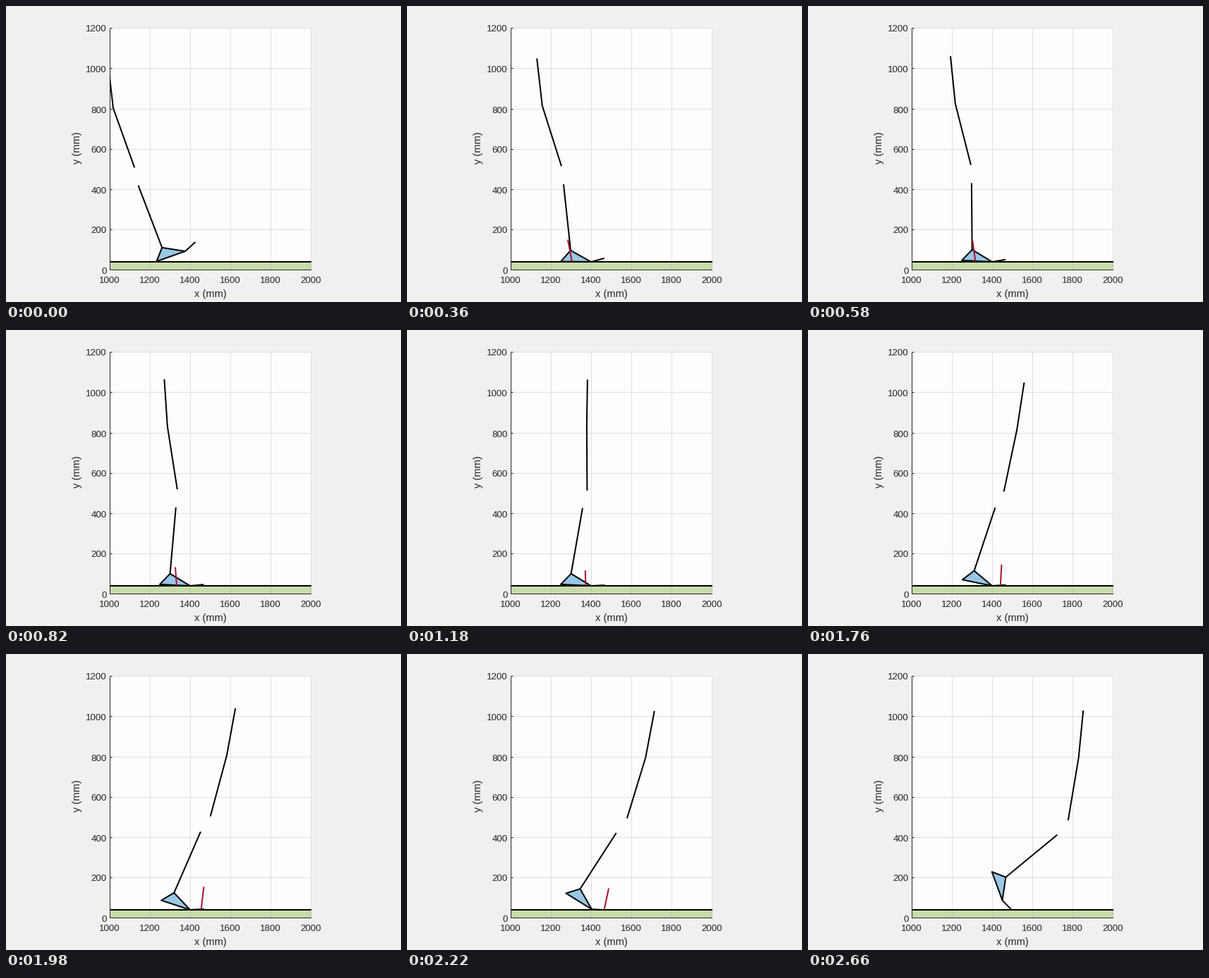
A matplotlib script that plays this animation: 560 px wide and 420 px high, repeating every 2.76 s.

```python
import numpy as np
import matplotlib
import matplotlib.pyplot as plt
from matplotlib.animation import FuncAnimation
from matplotlib.patches import Polygon, Rectangle

W, H, DPI = 560, 420, 100
PX = 72 / DPI  # one pixel in points
TICK = 20      # ms per drawn frame
LEFT, RIGHT, TOP, BOTTOM = 147, 432, 31, 374
GROUND = 363
STEP = 57.1    # pixels per 200 mm
INK = "#262626"
matplotlib.rcParams["font.family"] = "Liberation Sans"

# The 42 poses are held unevenly: 100 and 20 ms in turn.
run = [100, 20] * 4 + [100]
holds = np.array([100, 20] + run * 4 + [20, 100, 100])
holds = np.array([100, 20] + run + run * 3 + [100, 20, 100, 100])
pose_at = np.repeat(np.arange(len(holds)), holds // TICK)
pose = np.arange(len(holds))
LAST = pose[-1]
KEYS = np.array([0, 6, 13, 24, 35, 41]) / LAST


def smooth(*vals):
    """Polynomial through the key values, sampled at every pose."""
    return np.polyval(np.polyfit(KEYS, vals, len(KEYS) - 1), pose / LAST)


def up(start, length, degrees):
    """End of a segment leaning by degrees from the vertical."""
    a = np.radians(degrees)
    return start + length * np.stack([np.sin(a), -np.cos(a)], axis=1)


# The ball of the foot lands, rests on the ground, then pushes off.
land = np.clip(1 - pose / 6, 0, 1) ** 2
push = np.clip((pose - 33) / 8, 0, 1) ** 2
ball = np.stack([261 - 7 * land + 14.5 * push, GROUND - 15 * land - 13.5 * push], axis=1)

# The foot is a rigid triangle; the leg is a chain of segments above it.
foot_angle = smooth(-19.5, 0.6, 2.7, 6, 31.8, 70)
heel = up(ball, 43, foot_angle - 90)
ankle = up(ball, 33.2, foot_angle + 28.5 - 90)
toe = up(ball, 19.5, smooth(-42, -15, -5.4, -2.8, 3, 46) + 90)
shank = up(ankle, 94.5, smooth(-20.9, -6.1, 5, 13.7, 32.8, 50.5))
knee = up(shank, 25.7, smooth(-11.8, -6.6, 4.4, 22.6, 36.4, 37))
thigh = up(knee, 90, smooth(-19.7, -17.6, -8.9, 6.7, 17, 9.5))
hip = up(thigh, 67.5, smooth(-6.5, -6.5, -3.8, 5.5, 10.7, 5.6))

# Ground reaction force: point of action, lean and height of its arrow.
base = smooth(213, 234, 242, 265, 279.5, 288)
lean = smooth(0, -6, -2, 0, 6.5, 0)
height = smooth(1.5, 31.5, 26.5, 25, 30.5, 1.5)

fig = plt.figure(figsize=(W / DPI, H / DPI), dpi=DPI, facecolor="#f0f0f0")
ax = fig.add_axes([0, 0, 1, 1])
ax.set_xlim(0, W)
ax.set_ylim(H, 0)
ax.axis("off")


def line(xs, ys, color, width, z):
    return ax.plot(xs, ys, color=color, lw=width * PX, zorder=z, snap=False,
                   solid_capstyle="butt", solid_joinstyle="round")[0]


def label(x, y, text, size, ha="center", rotation=0):
    ax.text(x, y, text, fontsize=size * PX, color=INK, ha=ha, va="center",
            rotation=rotation)


def box(top, bottom, color, z, alpha=1):
    return ax.add_patch(Rectangle((LEFT, top), RIGHT + 1 - LEFT, bottom - top,
                                  fc=color, alpha=alpha, lw=0, zorder=z, snap=False))


plot_box = box(TOP, BOTTOM + 1, "#fdfdfe", 0)

GRID = "#dedee8"
left, right = LEFT + 0.5, RIGHT + 0.5
top, bottom = TOP + 0.5, BOTTOM + 0.5
for k in range(6):
    x = LEFT + int(k * STEP)
    line([x + 0.5] * 2, [top, bottom], GRID, 1, 1)
    label(x, 390, str(1000 + 200 * k), 13.33)
for k in range(7):
    y = BOTTOM - round(k * STEP)
    line([left, right], [y + 0.5] * 2, GRID, 1, 1)
    line([left, left + 3], [y + 0.5] * 2, INK, 1, 3)
    label(142.5, y + 2.5, str(200 * k), 13.33, ha="right")
label(290, 409, "x (mm)", 14.67)
label(100.5, 201.5, "y (mm)", 14.67, rotation=90)

box(GROUND, BOTTOM + 1, "#77ac30", 2, alpha=0.4)
line([left, left], [top, bottom], INK, 1, 3)
line([LEFT, RIGHT + 1], [bottom, bottom], INK, 1, 3)
line([LEFT, RIGHT + 1], [GROUND, GROUND], "black", 2, 4)

foot = Polygon(np.zeros((3, 2)), fc="#99c7e5", ec="black", lw=2 * PX,
               joinstyle="round", zorder=5)
ax.add_patch(foot)
thigh_line, shank_line, toe_line = (line([], [], "black", 2, 6) for _ in range(3))
force_line = line([], [], "#a2142f", 2, 7)
for part in (foot, thigh_line, shank_line, toe_line, force_line):
    part.set_clip_path(plot_box)


def join(artist, i, *joints):
    artist.set_data(*np.array([j[i] for j in joints]).T)


def draw(tick):
    i = pose_at[tick]
    join(thigh_line, i, hip, thigh, knee)
    join(shank_line, i, shank, ankle)
    join(toe_line, i, ball, toe)
    foot.set_xy([ankle[i], heel[i], ball[i]])
    force_line.set_data([base[i], base[i] + lean[i]], [GROUND, GROUND - height[i]])
    return foot, thigh_line, shank_line, toe_line, force_line


anim = FuncAnimation(fig, draw, frames=len(pose_at), interval=TICK,
                     repeat=True, repeat_delay=0, blit=False)
plt.show()
```
